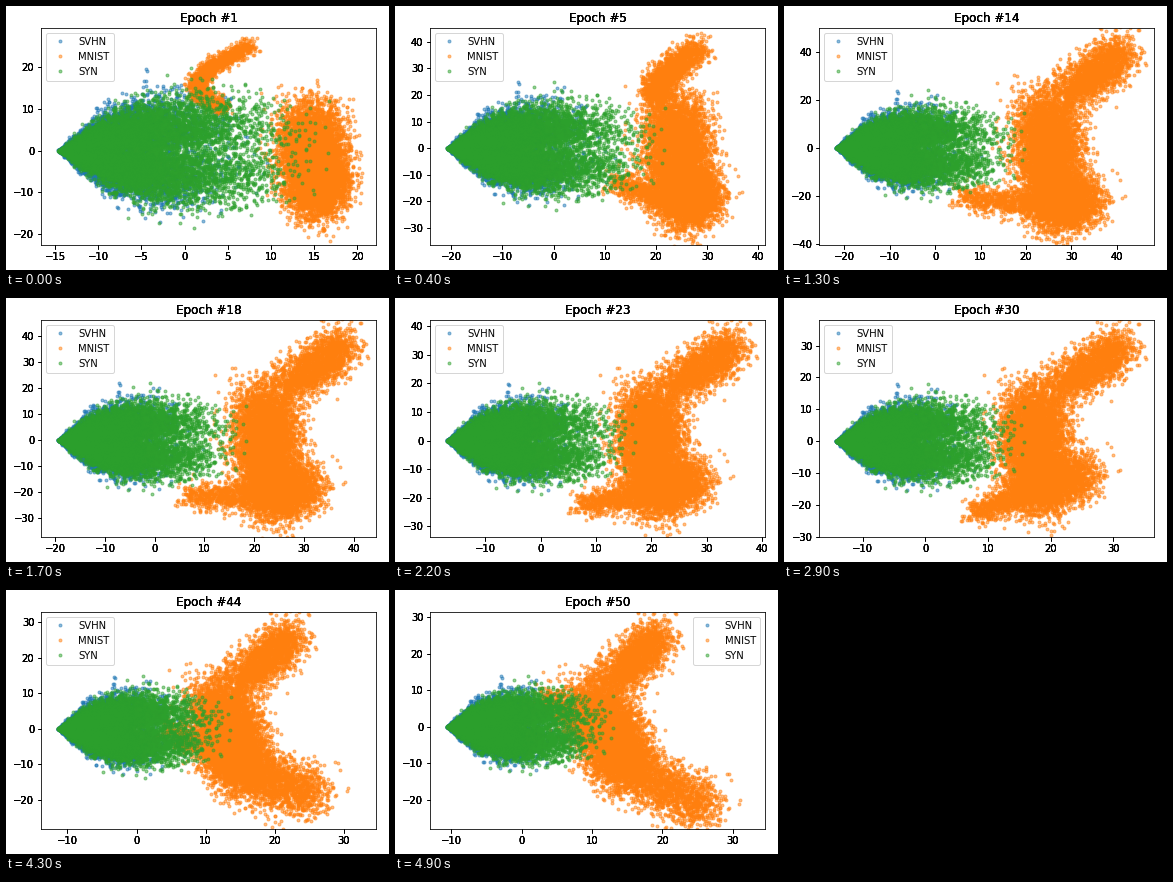
A matplotlib script for the animation above (5000 ms loop, 383 by 264 pixels).

```python
import numpy as np
import matplotlib.pyplot as plt
from matplotlib.animation import FuncAnimation
from matplotlib.transforms import IdentityTransform

WIDTH, HEIGHT, DPI = 383, 264, 72
FRAMES, INTERVAL = 50, 100
POINTS = 10000
LEFT, BOTTOM, AXES_W, AXES_H = 35.28, 24.6, 334.8, 217.44
TIP_X = 52
LEGEND_SWITCH = 46


def pose(limits, length, bend, **anchors):
    values = dict(limits=limits, length=length, bend=bend, **anchors)
    return {name: np.array(value, float) for name, value in values.items()}


# Axis limits in data units, anchors of the clouds in stage pixels (y down).
POSES = {
    1: pose((-16.6, 22.2, -22.8, 29.5), 310, -162, top=(304, 115),
            bottom=(310, 190), arm=(245, 40), foot=(302, 165), skirt=(318, 170)),
    10: pose((-28.3, 52.0, -44.1, 53.8), 215, 0, top=(266, 103),
             bottom=(275, 205), arm=(338, 45), foot=(175, 183), skirt=(306, 200)),
    38: pose((-15.7, 34.8, -28.7, 36.3), 215, 0, top=(248, 105),
             bottom=(250, 192), arm=(338, 48), foot=(192, 218), skirt=(300, 172)),
    50: pose((-13.0, 34.6, -28.2, 31.5), 190, 0, top=(196, 110),
             bottom=(232, 178), arm=(264, 45), foot=(150, 105), skirt=(312, 217)),
}

rng = np.random.default_rng(4)


def pose_at(epoch):
    """Blend the neighbouring poses with a sine ease-out."""
    keys = list(POSES)
    i = min(np.searchsorted(keys, epoch, side="right"), len(keys) - 1)
    start, end = keys[i - 1], keys[i]
    p = np.sin(np.pi / 2 * (epoch - start) / (end - start))
    a, b = POSES[start], POSES[end]
    return {name: a[name] + p * (b[name] - a[name]) for name in a}


def wedge_sample(tail):
    """Position along the wedge and signed offset across it."""
    n = rng.normal(size=POINTS)
    return rng.beta(1.8, tail, POINTS), np.sign(n) * np.abs(n) ** 0.75 / 1.66


def lobe_sample(share):
    """Position along a lobe and Gaussian offset around it."""
    count = int(share * POINTS)
    return rng.random((count, 1)), rng.normal(size=(count, 2))


SVHN = wedge_sample(tail=9)
SYN = wedge_sample(tail=5)
CORE, ARM, FOOT, SKIRT = map(lobe_sample, (0.58, 0.18, 0.08, 0.16))


def wedge(sample, now, stretch=1.0):
    along, across = sample
    low, high = now["limits"][2:]
    zero_line = HEIGHT - BOTTOM + AXES_H * low / (high - low)
    half = 0.175 * now["length"] * stretch
    x = TIP_X + now["length"] * along
    return x, zero_line + half * np.tanh(4 * along) * across


def lobe(sample, start, end, width):
    along, offset = sample
    return start + (end - start) * along + width * offset


def bent_arm(now):
    """Outer part of a quadratic curve; the more it bends, the thinner."""
    along, offset = ARM
    t = 0.3 + 0.7 * along
    top, tip, bend = now["top"], now["arm"], now["bend"]
    elbow = (top + tip) / 2 + bend * np.array([1, -0.12])
    curve = (1 - t) ** 2 * top + 2 * t * (1 - t) * elbow + t ** 2 * tip
    return curve + 11 / (1 + abs(bend) / 100) * offset


def mnist(now):
    return np.vstack([
        lobe(CORE, now["top"], now["bottom"], 16),
        bent_arm(now),
        lobe(FOOT, now["bottom"], now["foot"], 6.5),
        lobe(SKIRT, now["bottom"], now["skirt"], 13),
    ]).T


fig = plt.figure(figsize=(WIDTH / DPI, HEIGHT / DPI), dpi=DPI, facecolor="white")
box = [LEFT / WIDTH, BOTTOM / HEIGHT, AXES_W / WIDTH, AXES_H / HEIGHT]
ax = fig.add_axes(box)
# Repeated passes of title and ticks give the heavy, hard-edged lettering.
layers = [ax] + [fig.add_axes(box, frameon=False, label=f"pass {i}")
                 for i in range(3)]

clouds = [
    ax.plot([], [], ".", color=color, alpha=0.5, label=label,
            transform=IdentityTransform())[0]
    for label, color in [("SVHN", "C0"), ("MNIST", "C1"), ("SYN", "C2")]
]
legend = ax.legend(loc="upper left")


def draw(frame):
    epoch = frame + 1
    now = pose_at(epoch)
    left, right, low, high = now["limits"]
    for layer in layers:
        layer.set(xlim=(left, right), ylim=(low, high), title=f"Epoch #{epoch}")

    positions = [wedge(SVHN, now, stretch=1.08), mnist(now), wedge(SYN, now)]
    for cloud, (x, y) in zip(clouds, positions):
        cloud.set_data(x, HEIGHT - y)
    legend.set_loc("upper right" if epoch >= LEGEND_SWITCH else "upper left")
    return clouds


animation = FuncAnimation(fig, draw, frames=FRAMES, interval=INTERVAL,
                          repeat=True, repeat_delay=0, blit=False)
plt.show()
```
